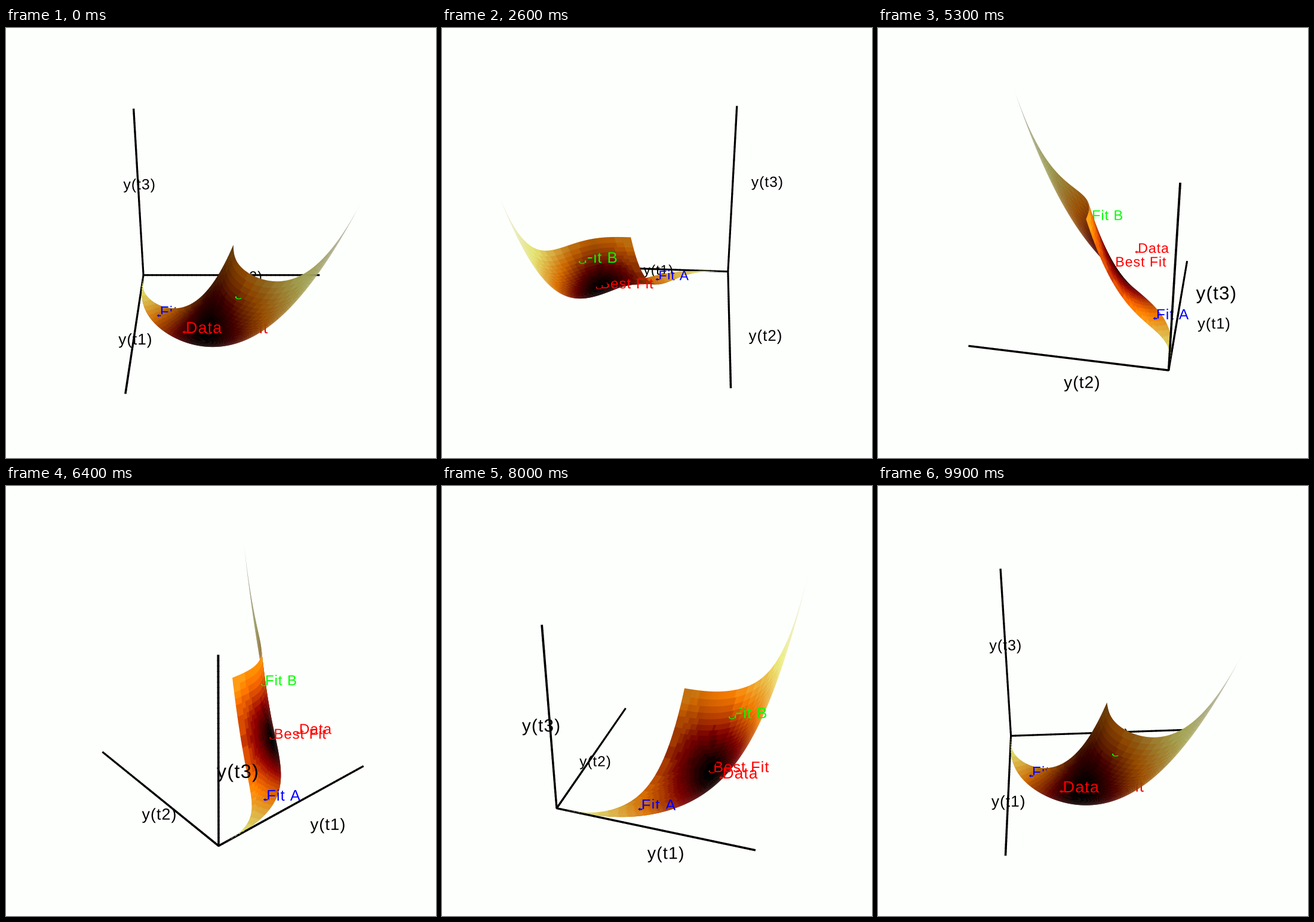
A matplotlib script that plays this animation: 720x720 px, repeating every 10 s.

```python
import numpy as np
import matplotlib.pyplot as plt
from matplotlib.animation import FuncAnimation
from matplotlib.collections import PathCollection
from matplotlib.path import Path
from matplotlib.textpath import TextPath

SIZE, FRAMES, INTERVAL = 720, 100, 100
FOCAL = SIZE / 2 / np.tan(np.radians(15))
CENTER = np.array([0.7586, 0.8819, 0.877])
DIST, ELEV = 8.02, np.radians(30.8)
AXIS_EM, NOTE_EM = 0.162, 0.153
TRACK, PAD, DROP = 0.04, 0.08, 0.06
BANDS = 26
DATA = np.array([1.528, 0.535, 0.349])
RATES = np.array([1, 3, 9])  # decay rates relative to t1
FONT = {"family": "Liberation Sans"}
BLACK, RED, GREEN, BLUE = (0, 0, 0), (1, 0, 0), (0, 1, 0), (0, 0, 1)


def model(p, q):
    """Sum of two exponentials sampled at the three times."""
    p, q = np.asarray(p), np.asarray(q)
    return p[..., None] ** RATES + q[..., None] ** RATES


def slope(p):
    return RATES * p[..., None] ** (RATES - 1)


def light(elev, azim, power):
    e, a = np.radians([elev, azim])
    return power * np.array([np.cos(e) * np.sin(a), np.sin(e),
                             np.cos(e) * np.cos(a)])


LIGHTS = np.array([light(45, 45, 1), light(-30, -60, 0.6), light(-30, 60, 0.5)])


def camera(phi):
    """Rows: right, up, towards the viewer."""
    c, s, ce, se = np.cos(phi), np.sin(phi), np.cos(ELEV), np.sin(ELEV)
    return np.array([[-s, c, 0], [-se * c, -se * s, ce], [ce * c, ce * s, se]])


def project(pts, cam):
    v = (pts - CENTER) @ cam.T
    depth = DIST - v[..., 2]
    k = FOCAL / depth
    xy = np.stack([SIZE / 2 + v[..., 0] * k, SIZE / 2 - v[..., 1] * k], -1)
    return xy, depth


def unit(v):
    return v / np.maximum(np.linalg.norm(v, axis=-1, keepdims=True), 1e-9)


def grow(quads, by=0.5):
    """Push the sides of each quad outwards so that no seams show."""
    a, b, c, d = np.moveaxis(quads, 1, 0)
    e, f = by * unit(b - a + c - d), by * unit(d - a + c - b)
    return np.stack([a - e - f, b + e - f, c + e + f, d - e + f], 1)


def text_shape(s):
    def right(t):
        return TextPath((0, 0), t, size=1, prop=FONT).get_extents().x1

    bar = right("|")
    glyphs = []
    for i, ch in enumerate(s):
        if ch != " ":
            x = PAD + right(s[:i] + "|") - bar + i * TRACK
            glyphs.append(TextPath((x, -DROP), ch, size=1, prop=FONT))
    return Path(np.vstack([g.vertices for g in glyphs]),
                np.concatenate([g.codes for g in glyphs]))


def hook_shape():
    a = np.radians(np.linspace(150, 325, 12))
    arc = np.stack([np.cos(a), 0.55 * np.sin(a)], 1)
    return Path(np.vstack([0.22 * arc, 0.14 * arc[::-1]]))


HOOK = hook_shape()
ARROW = Path([(-0.14, 0), (0.03, 0.11), (0, 0.03), (0.15, 0.04),
              (0.13, -0.06), (0, -0.04), (0.02, -0.11)])

# Surface patches
p = np.linspace(0.005, 1, 73)[:, None] ** 0.6
s = np.linspace(0.0005, 1, 57)[None, :] ** 0.6
p, q = p + 0 * s, p * s
GRID = model(p, q)


def middle(g):
    return (g[:-1, :-1] + g[1:, :-1] + g[1:, 1:] + g[:-1, 1:]) / 4


pm, qm = middle(p), middle(q)
MID = model(pm, qm).reshape(-1, 3)
NORMAL = unit(np.cross(slope(qm), slope(pm)).reshape(-1, 3))


def log_cost(y):
    return np.log(((y - DATA) ** 2).sum(-1))


low, high = log_cost(GRID).min(), log_cost(GRID).max()
level = np.round((log_cost(MID) - low) / (high - low) * BANDS) / BANDS
HEAT = plt.get_cmap("afmhot")(level)[:, :3]

# Flat items that face the viewer: shape, anchor, em, colour, shift to the front
best, fit_a, fit_b = model(0.85, 0.53), model(0.605, 0.19), model(0.965, 0.53)
SIGNS = [(text_shape(t), np.array(at), AXIS_EM, BLACK, 0) for t, at in (
    ("y(t1)", (1, -0.2, -0.2)),
    ("y(t2)", (-0.2, 1, -0.2)),
    ("y(t3)", (-0.2, -0.2, 1)))]
for word, at, col, mark, front in (("Data", DATA, RED, ARROW, 0),
                                   ("Best Fit", best, RED, HOOK, 0.12),
                                   ("Fit A", fit_a, BLUE, ARROW, 0.12),
                                   ("Fit B", fit_b, GREEN, HOOK, 0.12)):
    SIGNS += [(text_shape(word), at, NOTE_EM, col, 0),
              (mark, at, NOTE_EM, col, front)]

AXES = np.linspace(0, 2, 41)[None, :, None] * np.eye(3)[:, None, :]


def surface(cam):
    xy, depth = project(GRID, cam)
    quads = np.stack([xy[:-1, :-1], xy[1:, :-1], xy[1:, 1:], xy[:-1, 1:]], 2)
    view = CENTER + DIST * cam[2] - MID
    facing = np.sign((NORMAL * view).sum(1, keepdims=True))
    n = (NORMAL * facing) @ cam.T
    lit = np.maximum(n @ LIGHTS.T, 0).sum(1, keepdims=True)
    return (grow(quads.reshape(-1, 4, 2)), middle(depth).ravel(),
            np.clip(HEAT * lit, 0, 1))


def axis_lines(cam):
    xy, depth = project(AXES, cam)
    along = unit(xy[:, -1:] - xy[:, :1])
    side = np.stack([-along[..., 1], along[..., 0]], -1)
    side = side * (FOCAL * 0.007 / depth)[..., None]
    a, b = xy + side, xy - side
    quads = np.stack([a[:, :-1], a[:, 1:], b[:, 1:], b[:, :-1]], 2)
    mid = (depth[:, 1:] + depth[:, :-1]) / 2
    return grow(quads.reshape(-1, 4, 2)), mid.ravel(), np.zeros((mid.size, 3))


def sign(item, cam):
    shape, at, size, col, front = item
    xy, depth = project(at, cam)
    em = FOCAL * size / depth
    return Path(xy + shape.vertices * [em, -em], shape.codes), depth - front, col


def draw(i):
    cam = camera(2 * np.pi * i / FRAMES)
    q1, d1, c1 = surface(cam)
    q2, d2, c2 = axis_lines(cam)
    paths = [Path(v) for v in np.concatenate([q1, q2])]
    shapes, d3, c3 = zip(*(sign(item, cam) for item in SIGNS))
    paths += shapes
    order = np.argsort(-np.concatenate([d1, d2, d3]), kind="stable")
    scene.set_paths([paths[k] for k in order])
    scene.set_facecolor(np.vstack([c1, c2, c3])[order])
    return [scene]


fig = plt.figure(figsize=(10, 10), dpi=SIZE / 10, facecolor="#fdfffc")
ax = fig.add_axes([0, 0, 1, 1])
ax.set(xlim=(0, SIZE), ylim=(SIZE, 0))
ax.axis("off")
scene = PathCollection([Path([(0, 0), (1, 0), (1, 1)])], linewidths=0,
                       edgecolors="none")
scene.set_snap(False)
ax.add_collection(scene, autolim=False)

anim = FuncAnimation(fig, draw, frames=FRAMES, interval=INTERVAL, repeat=True,
                     repeat_delay=0)
plt.show()
```
